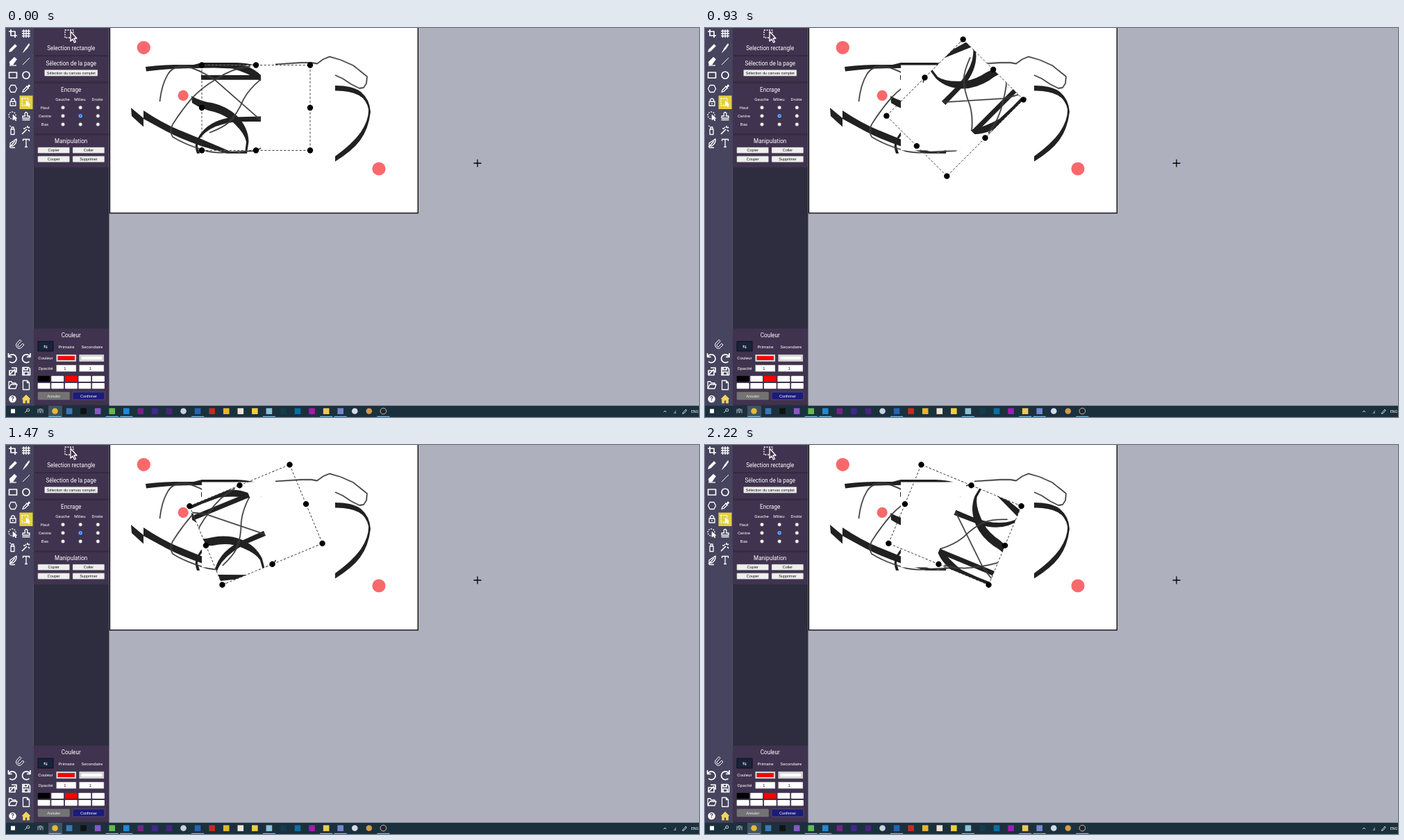
An HTML page for the animation above (2.25 s loop, 998 by 561 pixels).

```html
<!DOCTYPE html>
<html lang="fr">
<head>
<meta charset="utf-8">
<title>Rotation de la sélection</title>
<style>
html, body { margin: 0; width: 100%; height: 100%; overflow: hidden; background: #aeb0be; }
svg { display: block; width: 998px; height: 561px; }
text { font-family: Roboto, Arial, sans-serif; fill: #fff; text-anchor: middle; }
.btn { font-family: "Liberation Sans", Arial, sans-serif; }
.thin { fill: none; stroke: #2e2e2e; stroke-width: 1.3; stroke-linejoin: round; }
.halo { fill: none; stroke: #777; stroke-width: 2.8; opacity: .35; }
.band { fill: #212121; }
.icon { fill: none; stroke: #fff; stroke-width: 1.3; stroke-linejoin: round; }
.solid { fill: #fff; stroke-width: .6; }
</style>
</head>
<body>
<svg viewBox="0 0 998 561">
  <defs>
    <clipPath id="outside"><path clip-rule="evenodd" d="M150 0H593V266H150ZM282 53.5V176.5H367V53.5Z"/></clipPath>
    <clipPath id="inside"><rect x="282" y="53.5" width="85" height="123"/></clipPath>
    <path id="lines" d="M221.5 106Q224 82 233 67Q240 55 256 55Q276 58 301 75L367 133
      M352 55Q326 58 304 73Q283 85 268 101Q251 121 240 139Q235 149 240 157Q259 169 291 178Q305 181 321 179L361 177L367 173
      M367 74Q350 88 342 103Q333 124 322 135Q314 143 293 151
      M388 52.3L425 50H440L448 51.5L457 45L466 41.3L482 46L500 54L520 70L519 80L515 86L509 87L497 81L485 73L474 68"/>
    <g id="ink">
      <g class="band">
        <path d="M201 56C225 52.5 255 53 270 53L282 50L332 50Q348 51 358 53.3Q350 54 344 54Q358 59 367 68V76.5Q349 65 326 58.5L300 57.5L272 58Q235 58 202 62.5Z"/>
        <path d="M281 68H367V74.8H281Z"/>
        <path d="M267 98Q281 106 297 108Q318 113 332 126Q349 143 349.5 164L347 181H344L346 164Q344 153 330 139Q318 126 300 121Q283 118 268 108Z"/>
        <path d="M367 127.5V135H338Q312 136 294 146Q275 158 276 171L279 181H275Q270 169 276 159Q291 132 328 128.5Z"/>
        <path d="M198 119Q225 137 249 147L282 160.5L322 177.5L336 179.5L347 177V181H318L282 170.5Q254 161 231 149L198 131Z"/>
        <path d="M180 115L198 130V142.5L181 127Z"/>
        <path d="M474 83Q499 83 511 92Q524 103 525 121Q522 146 510 162Q499 177 474 192.5V185Q500 166 511 150Q523 132 522 117Q519 103 508 97Q495 90 474 90.5Z"/>
      </g>
      <use href="#lines" class="halo"/>
      <use href="#lines" class="thin"/>
    </g>
  </defs>

  <rect width="998" height="561" fill="#aeb0be"/>
  <rect x="149.5" y="-5" width="443.8" height="271.9" fill="#fff" stroke="#000" stroke-width="1.3"/>
  <use href="#ink" clip-path="url(#outside)"/>
  <g fill="#f9696b">
    <circle cx="198.3" cy="28.3" r="9.6"/>
    <circle cx="255.2" cy="97.4" r="7.6"/>
    <circle cx="537" cy="203" r="9.6"/>
  </g>
  <g id="sel">
    <rect x="282" y="53.5" width="85" height="123" fill="#fff"/>
    <use href="#ink" clip-path="url(#inside)"/>
    <rect x="282" y="53.5" width="156" height="123" fill="none" stroke="#333" stroke-width=".9" stroke-dasharray="3.2 2.4"/>
    <g id="handles"></g>
  </g>
  <path d="M673.5 195H684.5M679 189.5V200.5" stroke="#000" stroke-width="1.3"/>
  <g id="ui"></g>
</svg>
<script>
const $ = id => document.getElementById(id);
const rect = (x, y, w, h, fill, more = '') =>
  `<rect x="${x}" y="${y}" width="${w}" height="${h}" fill="${fill}" ${more}/>`;
const dot = (x, y, r, fill, more = '') =>
  `<circle cx="${x}" cy="${y}" r="${r}" fill="${fill}" ${more}/>`;
const text = (x, y, size, s, more = '') =>
  `<text x="${x}" y="${y}" font-size="${size}" ${more}>${s}</text>`;
const icon = (x, y, d, cls = '', more = '') =>
  `<path class="icon ${cls}" transform="translate(${x} ${y})" d="${d}" ${more}/>`;
const button = (x, y, w, h, s, bg = '#efefef', fg = '#111') =>
  rect(x, y, w, h, bg, 'stroke="#777" stroke-width=".5" rx=".8"') +
  text(x + w / 2, y + h / 2 + 2, 5.5, s, `class="btn" style="fill:${fg}"`);

function tools() {
  const arrow = 'M0 -2V6L2 4L4 7L5 6L3.5 3.5H6Z';
  const redo = 'M6 -7V-1.7H1M5.4 -2.4A5.9 5.9 0 1 0 4.5 5';
  const bold = 'style="stroke-width:1.7"';
  return rect(0, 0, 39.5, 545, '#46445e') +
    icon(10, 8, 'M-3 -6V3H6M-6 -3H3V6', '', bold) +
    icon(29, 8, 'M-3.5 -6V6M0 -6V6M3.5 -6V6M-6 -3.5H6M-6 0H6M-6 3.5H6') +
    icon(10, 29, 'M-5.5 5.5L-4.5 2L3 -5.5L5.5 -3L-2 4.5Z', 'solid') +
    icon(29, 29, 'M-4.5 6.5L-1 0L4 -6.5L5 -5L1 1Z', 'solid') +
    icon(10, 48, 'M-5 1L2 -6L5.5 -3L0 5H-4Z', 'solid') +
    icon(10, 48, 'M-5 6H5') +
    icon(29, 48, 'M-5 5L5 -5', '', 'style="stroke-width:1"') +
    icon(10, 68, 'M-5.5 -4H5.5V4H-5.5Z', '', bold) +
    icon(29, 68, 'M-5 0A5 5 0 1 1 5 0A5 5 0 1 1 -5 0Z', '', bold) +
    icon(10, 87.5, 'M-5.5 0L-3 -5H3L5.5 0L3 5H-3Z') +
    icon(29, 87.5, 'M-5 5L-4 2L1 -3L3 -1L-2 4Z') +
    icon(29, 87.5, 'M0 -4L2 -3L4 -6L6 -4L3 -2L4 0Z', 'solid') +
    icon(10, 107, 'M-4 -1H4V5H-4ZM-2.5 -1V-3.5Q0 -7 2.5 -3.5V-1M0 1V3') +
    rect(19.5, 97.5, 19, 19.5, '#e5cf3d') +
    icon(28, 106.5, 'M-5 -5H4V5H-5Z', '', 'stroke-dasharray="2 1.3"') +
    icon(29, 107, arrow, 'solid') +
    icon(9, 126, 'M-5 0A5 5 0 1 1 5 0A5 5 0 1 1 -5 0Z', '', 'stroke-dasharray="2 1.4"') +
    icon(10, 127, arrow, 'solid') +
    icon(29, 127, 'M-5.5 5.5H5.5M-5 3V0H-1.5L-2 -4Q0 -7 2 -4L1.5 0H5V3Z') +
    icon(10, 147, 'M-3 -1H2V6.5H-3ZM-2 -1V-4H1V-1M-5 -6L-3 -5') +
    icon(28, 147, 'M-5 6L2 -1M3 -6V-3M0 -4L1 -3M6 -4L4 -3M4 0L6 2M-3 -2H0', '', bold) +
    icon(10, 166, 'M-5 6L3 -3M-4 4V0L5 -6Q6 0 0 4ZM-4 6.5H3') +
    icon(29, 166, 'M-4.5 -3V-5.5H4.5V-3M0 -5.5V5.5M-2 5.5H2') +
    icon(19, 456, 'M1 -6.5L-4 -1A5 5 0 0 0 2 6L7 1L5 -1L0 4A2.3 2.3 0 0 1 -2 1L3 -4.5Z', '', 'style="stroke-width:1"') +
    icon(29, 476, redo, '', bold) +
    `<g transform="translate(19 0) scale(-1 1)">${icon(9.5, 476, redo, '', bold)}</g>` +
    icon(10, 495, 'M-5 -1H3V5.5H-5ZM-2 -5H5V2M-4 4L3 -3', '', bold) +
    icon(29, 495, 'M-5 -5.5H3.5L5.5 -3.5V5.5H-5ZM-3 -5V-2H2V-5M-3 5V1H3V5', '', bold) +
    icon(10, 515, 'M-6 5V-5H-2L-1 -3H4V-1M-6 5L-3 -1H6L4 5Z') +
    icon(29, 515, 'M-4.5 -6.5H1.5L4.5 -3.5V6.5H-4.5ZM1.5 -6.5V-3.5H4.5') +
    dot(9.5, 535, 5.3, '#fff') +
    text(9.5, 538.3, 9, '?', 'font-weight="bold" style="fill:#46445e"') +
    icon(29, 535, 'M-6 0L0 -6L6 0L4.5 0V6H1.3V2H-1.3V6H-4.5V0Z', '', 'style="fill:#f1d562;stroke:#f1d562;stroke-width:.6"');
}

function panel() {
  let s = rect(39.5, 0, 109, 545, '#2e2c3f');
  for (const [y, h] of [[0, 39], [41, 36.5], [79.5, 73], [154.5, 46.5], [433.5, 110]])
    s += rect(39.5, y, 108.5, h, '#40334f');
  for (const [y, t] of [[32.3, 'Selection rectangle'], [54.2, 'Sélection de la page'],
    [92.4, 'Encrage'], [165.6, 'Manipulation'], [445.6, 'Couleur']]) s += text(93.7, y, 8.15, t);

  s += icon(91, 9, 'M-6 -6H6V5H-6Z', '', 'stroke-dasharray="2 1.5"') +
    icon(93, 6, 'M0 -1V13L3 10L5.5 15L7.5 14L5 9H9Z', '', 'style="fill:#40334f"');
  s += button(55.5, 60.3, 76.5, 9, 'Sélection du canvas complet');

  ['Gauche', 'Milieu', 'Droite'].forEach((t, i) => s += text(81.5 + 25 * i, 105, 6.1, t));
  ['Haut', 'Centre', 'Bas'].forEach((t, j) => {
    s += text(56, 117 + 12 * j, 6.1, t);
    for (let i = 0; i < 3; i++) {
      const on = i === 1 && j === 1, x = 82 + 25.2 * i, y = 114.7 + 12.1 * j;
      s += dot(x, y, 2.5, '#fff', `stroke="${on ? '#0875ff' : '#777'}" stroke-width=".6"`);
      if (on) s += dot(x, y, 1.7, '#0875ff');
    }
  });
  ['Copier', 'Coller', 'Couper', 'Supprimer'].forEach((t, i) =>
    s += button(45.8 + 50.2 * (i % 2), 172 + (i > 1 ? 12.8 : 0), 45.8, 8.6, t));

  s += rect(46, 452, 22, 14, '#19233a', 'stroke="#0b1020"') + text(57, 461.5, 7, '⇆') +
    text(87, 461.5, 6.2, 'Primaire') + text(124, 461.5, 6.2, 'Secondaire') +
    text(57, 478, 6.2, 'Couleur') + text(57, 493, 6.2, 'Opacité');
  [[72.5, 28.5, '#f00'], [105.5, 35.5, '#fff']].forEach(([x, w, c]) => {
    s += rect(x, 471, w, 10, '#efefef', 'stroke="#777" stroke-width=".5"') +
      rect(x + 2, 473, w - 4, 6, c, 'stroke="#777" stroke-width=".5"') +
      rect(x, 486, w, 9.5, '#fff', 'stroke="#777" stroke-width=".5"') +
      text(x + w / 2 - 2, 493, 5.8, '1', 'class="btn" style="fill:#111"');
  });
  for (let i = 0; i < 10; i++)
    s += rect(45.7 + 19.6 * (i % 5), i < 5 ? 501.8 : 512, 17.8, 8.2,
      i === 0 ? '#000' : i === 2 ? '#f00' : '#fff', 'rx=".8"');
  return s + button(46, 525, 45.5, 11, 'Annuler', '#737373', '#eee') +
    button(96, 525, 46, 11, 'Confirmer', '#1b1b7b', '#fff');
}

function taskbar() {
  let s = rect(0, 544.7, 998, 16.3, '#1b303d') + rect(61, 544.7, 20, 16.3, '#3f5460') +
    rect(7, 549.5, 6, 6, '#fff') +
    icon(30, 552, 'M-3 3L0 0A2 2 0 1 1 2 1L0 0', '', 'style="stroke-width:.8"') +
    icon(49, 552.5, 'M-3 -3V3M-1 -3H2V0H-1ZM-1 2H2M4 -3V3', '', 'style="stroke-width:.7"');
  const apps = ['o#e4b93d', '#3b78b5', '#111', '#8a55c8', '#62b955', '#2488d0', '#742384',
    '#41278e', '#4b2381', 'o#c9d2de', '#2364b5', '#c82922', '#e5b72c', '#ece5d5', '#f2cf39',
    '#8cc2d8', '#123d4b', '#0870a6', '#a51bae', '#edc957', '#7388cf', 'o#d4dae8', 'o#d29c49', 'o#272727'];
  apps.forEach((a, i) => {
    const x = 70.5 + 20.56 * i;
    s += a[0] === 'o' ? dot(x, 552.5, 4.3, a.slice(1), i === 23 ? 'stroke="#ddd" stroke-width=".8"' : '')
      : rect(x - 4.3, 548.3, 8.6, 8.6, a);
    if ([0, 4, 5, 10, 15, 19, 20, 23].includes(i)) s += rect(x - 9, 559.8, 18, 1.2, '#78b9e8');
  });
  return s + icon(949, 553, 'M-2 1L0 -1L2 1', '', 'style="stroke-width:.8"') +
    icon(963, 553, 'M-2 3L2 -2V3Z', '', 'style="fill:#71818a;stroke:none"') +
    icon(977, 553, 'M-3 3L2 -3L3 -1L-1 3Z', '', 'style="stroke-width:.8"') +
    text(992, 555, 5.4, 'ENG');
}

$('ui').innerHTML = tools() + panel() + taskbar();
let knobs = '';
for (const i of [-1, 0, 1])
  for (const j of [-1, 0, 1])
    if (i || j) knobs += dot(360 + 78 * i, 115 + 61.5 * j, 4.2, '#000');
$('handles').innerHTML = knobs;

// Wheel flicks: [ms, notches turned], one notch is a sixteenth of a turn.
const wheel = [[0, 0], [30, 0], [420, 19], [480, 19], [570, 21], [630, 21], [930, 38],
  [990, 38], [1170, 43], [1410, 43], [1740, 64], [1800, 64], [1950, 71], [2160, 71],
  [2220, 73], [2250, 73]];

function notches(t) {
  const i = wheel.findIndex(k => k[0] > t);
  const [t0, n0] = wheel[i - 1], [t1, n1] = wheel[i];
  return Math.round(n0 + (n1 - n0) * (t - t0) / (t1 - t0));
}

function draw(ms) {
  const t = Math.floor((ms % 2250) / 30) * 30;
  $('sel').setAttribute('transform', `rotate(${notches(t) * 22.5 % 360} 360 115)`);
}

let start;
function tick(now) {
  start ??= now;
  draw(Math.max(0, now - start));
  requestAnimationFrame(tick);
}
draw(0);
requestAnimationFrame(tick);
</script>
</body>
</html>
```
